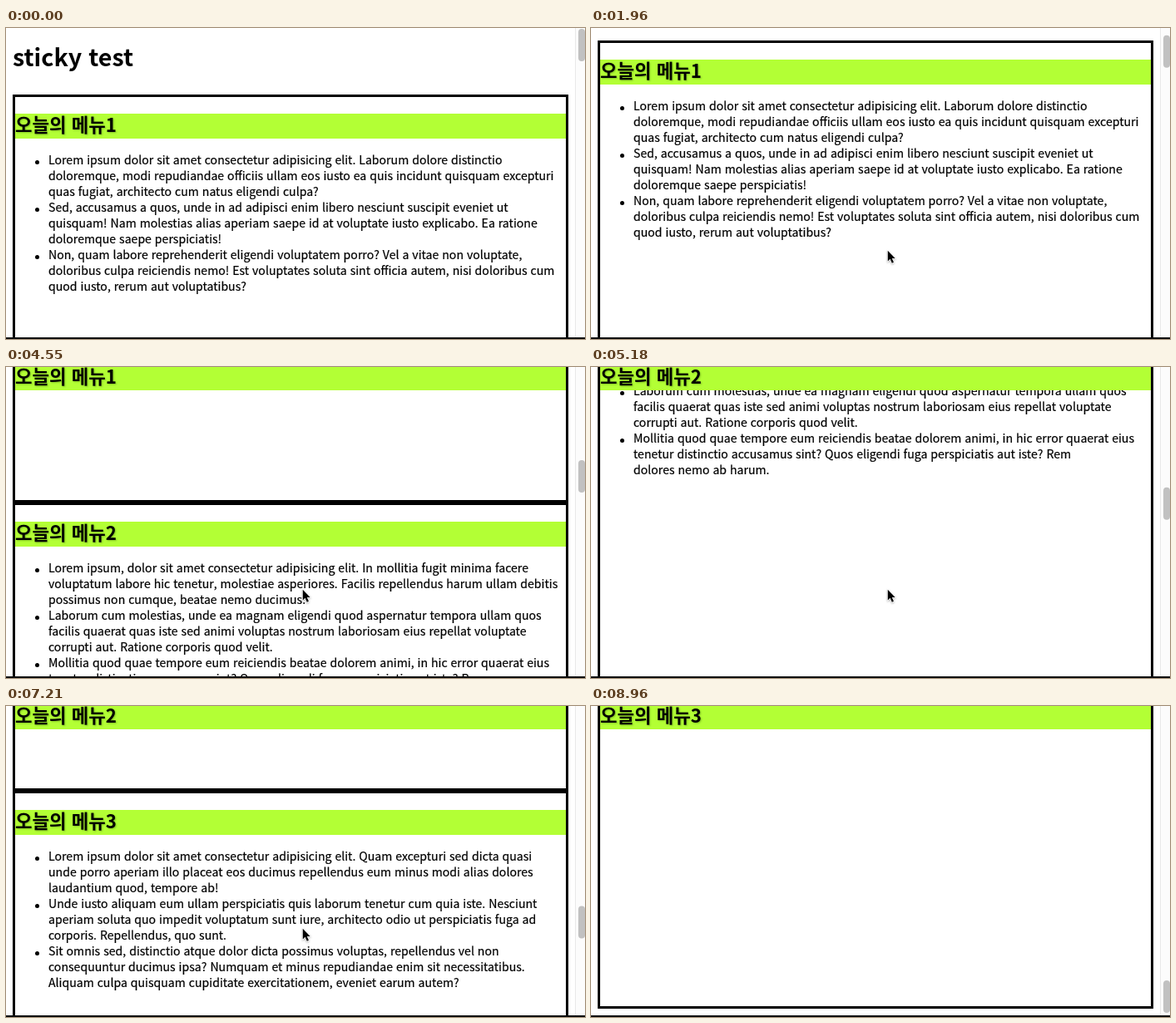
These frames come from a looping animation (696x374 px, 9870 ms). An HTML page:

```html
<!DOCTYPE html>
<html lang="ko">
<head>
<meta charset="utf-8">
<title>sticky test</title>
<style>
  html, body { margin: 0; width: 100%; height: 100%; overflow: hidden; background: #fff; }
  #stage {
    position: relative; width: 696px; height: 374px; overflow: hidden; background: #fff; color: #000;
    font: 14.1px/19px "Noto Sans CJK KR", "Noto Sans KR", "Noto Sans CJK", sans-serif;
  }
  #view { position: absolute; left: 0; top: 0; width: 684px; height: 372px; overflow: hidden; }
  #page { position: relative; height: 3088px; }
  h1, h2, ul { margin: 0; padding: 0; white-space: nowrap; }
  h1 { position: absolute; left: 8px; top: 15px; font-size: 28.7px; line-height: 37px; }
  section {
    position: absolute; left: 8px; width: 668px; height: 1000px;
    box-sizing: border-box; border: 3px solid #000; padding: 20px 0;
  }
  h2 {
    position: sticky; top: -2px; z-index: 1; height: 24px; padding-bottom: 6px;
    font-size: 22.3px; line-height: 24px; background: #b3ff35;
    text-shadow: 1px 1px 2px rgba(40, 80, 0, .35);
  }
  ul { position: absolute; left: 40px; top: 66px; list-style: none; -webkit-text-stroke: .2px #000; }
  li { position: relative; white-space: pre; }
  li::before {
    content: ""; position: absolute; left: -16px; top: 10px;
    width: 5px; height: 5px; border-radius: 50%; background: #000;
  }
  #track { position: absolute; left: 684px; top: 0; width: 11px; height: 372px; background: #fcfcfc; border-left: 1px solid #e9e9e9; }
  #thumb { position: absolute; left: 688px; top: 1px; width: 8px; height: 39px; border-radius: 4px; background: #c1c1c1; }
  #edge { position: absolute; left: 0; top: 372px; width: 696px; height: 2px; background: #0c0c0c; }
  #cursor { position: absolute; left: 354px; top: 265px; filter: drop-shadow(0 1px 1px rgba(0, 0, 0, .3)); }
</style>
</head>
<body>
<div id="stage">
  <div id="view"><div id="page"><h1>sticky test</h1></div></div>
  <div id="track"></div>
  <div id="thumb"></div>
  <svg id="cursor" width="16.5" height="22" viewBox="-3 -3 18 24">
    <path d="M0 0V13.8L3.1 10.9L5.5 16.4L7.8 15.4L5.5 10H9.7Z" stroke="#fff" stroke-width="1.4" paint-order="stroke"/>
  </svg>
  <div id="edge"></div>
</div>
<script>
const LOOP = 9870, TICK = 70, MAX_SCROLL = 2716, THUMB_TRAVEL = 329;

const menus = [
  [
    `Lorem ipsum dolor sit amet consectetur adipisicing elit. Laborum dolore distinctio
doloremque, modi repudiandae officiis ullam eos iusto ea quis incidunt quisquam excepturi
quas fugiat, architecto cum natus eligendi culpa?`,
    `Sed, accusamus a quos, unde in ad adipisci enim libero nesciunt suscipit eveniet ut
quisquam! Nam molestias alias aperiam saepe id at voluptate iusto explicabo. Ea ratione
doloremque saepe perspiciatis!`,
    `Non, quam labore reprehenderit eligendi voluptatem porro? Vel a vitae non voluptate,
doloribus culpa reiciendis nemo! Est voluptates soluta sint officia autem, nisi doloribus cum
quod iusto, rerum aut voluptatibus?`
  ],
  [
    `Lorem ipsum, dolor sit amet consectetur adipisicing elit. In mollitia fugit minima facere
voluptatum labore hic tenetur, molestiae asperiores. Facilis repellendus harum ullam debitis
possimus non cumque, beatae nemo ducimus.`,
    `Laborum cum molestias, unde ea magnam eligendi quod aspernatur tempora ullam quos
facilis quaerat quas iste sed animi voluptas nostrum laboriosam eius repellat voluptate
corrupti aut. Ratione corporis quod velit.`,
    `Mollitia quod quae tempore eum reiciendis beatae dolorem animi, in hic error quaerat eius
tenetur distinctio accusamus sint? Quos eligendi fuga perspiciatis aut iste? Rem
dolores nemo ab harum.`
  ],
  [
    `Lorem ipsum dolor sit amet consectetur adipisicing elit. Quam excepturi sed dicta quasi
unde porro aperiam illo placeat eos ducimus repellendus eum minus modi alias dolores
laudantium quod, tempore ab!`,
    `Unde iusto aliquam eum ullam perspiciatis quis laborum tenetur cum quia iste. Nesciunt
aperiam soluta quo impedit voluptatum sunt iure, architecto odio ut perspiciatis fuga ad
corporis. Repellendus, quo sunt.`,
    `Sit omnis sed, distinctio atque dolor dicta possimus voluptas, repellendus vel non
consequuntur ducimus ipsa? Numquam et minus repudiandae enim sit necessitatibus.
Aliquam culpa quisquam cupiditate exercitationem, eveniet earum autem?`
  ]
];

// Scroll gestures as [time in ms, offset in px]
const keys = [
  [0, 0], [1190, 0], [1610, 52], [1890, 52], [1960, 65], [2100, 89], [2310, 89],
  [2940, 196], [3290, 246], [3360, 246], [4550, 917], [4830, 1108], [4900, 1108],
  [5670, 1371], [5740, 1371], [6090, 1552], [6160, 1552], [6580, 1733], [7210, 1978],
  [7630, 2125], [7770, 2125], [8820, MAX_SCROLL], [LOOP, MAX_SCROLL]
];

const $ = id => document.getElementById(id);
const view = $('view'), thumb = $('thumb'), cursor = $('cursor');

menus.forEach((items, i) => {
  const section = document.createElement('section');
  section.style.top = 80 + i * 1000 + 'px';
  section.innerHTML = `<h2>오늘의 메뉴${i + 1}</h2><ul>${items.map(text => `<li>${text}</li>`).join('')}</ul>`;
  $('page').append(section);
});

const slope = i => (keys[i + 1][1] - keys[i][1]) / (keys[i + 1][0] - keys[i][0]);

// Harmonic mean keeps the curve monotone and flat at rests
function tangent(i) {
  if (i === 0 || i === keys.length - 1) return 0;
  const a = slope(i - 1), b = slope(i);
  return a * b > 0 ? 2 * a * b / (a + b) : 0;
}

function scrollAt(t) {
  let i = 0;
  while (i < keys.length - 2 && keys[i + 1][0] <= t) i++;
  const [t0, y0] = keys[i], [t1, y1] = keys[i + 1];
  const span = t1 - t0, u = (t - t0) / span, v = 1 - u;
  return y0 * v * v * (1 + 2 * u) + y1 * u * u * (3 - 2 * u)
    + span * u * v * (v * tangent(i) - u * tangent(i + 1));
}

function draw() {
  const t = Math.floor(performance.now() % LOOP / TICK) * TICK;
  const y = Math.round(scrollAt(t));
  view.scrollTop = y;
  thumb.style.transform = `translateY(${y / MAX_SCROLL * THUMB_TRAVEL}px)`;
  cursor.style.visibility = t >= 70 && t < 8960 ? 'visible' : 'hidden';
  requestAnimationFrame(draw);
}
draw();
</script>
</body>
</html>
```
